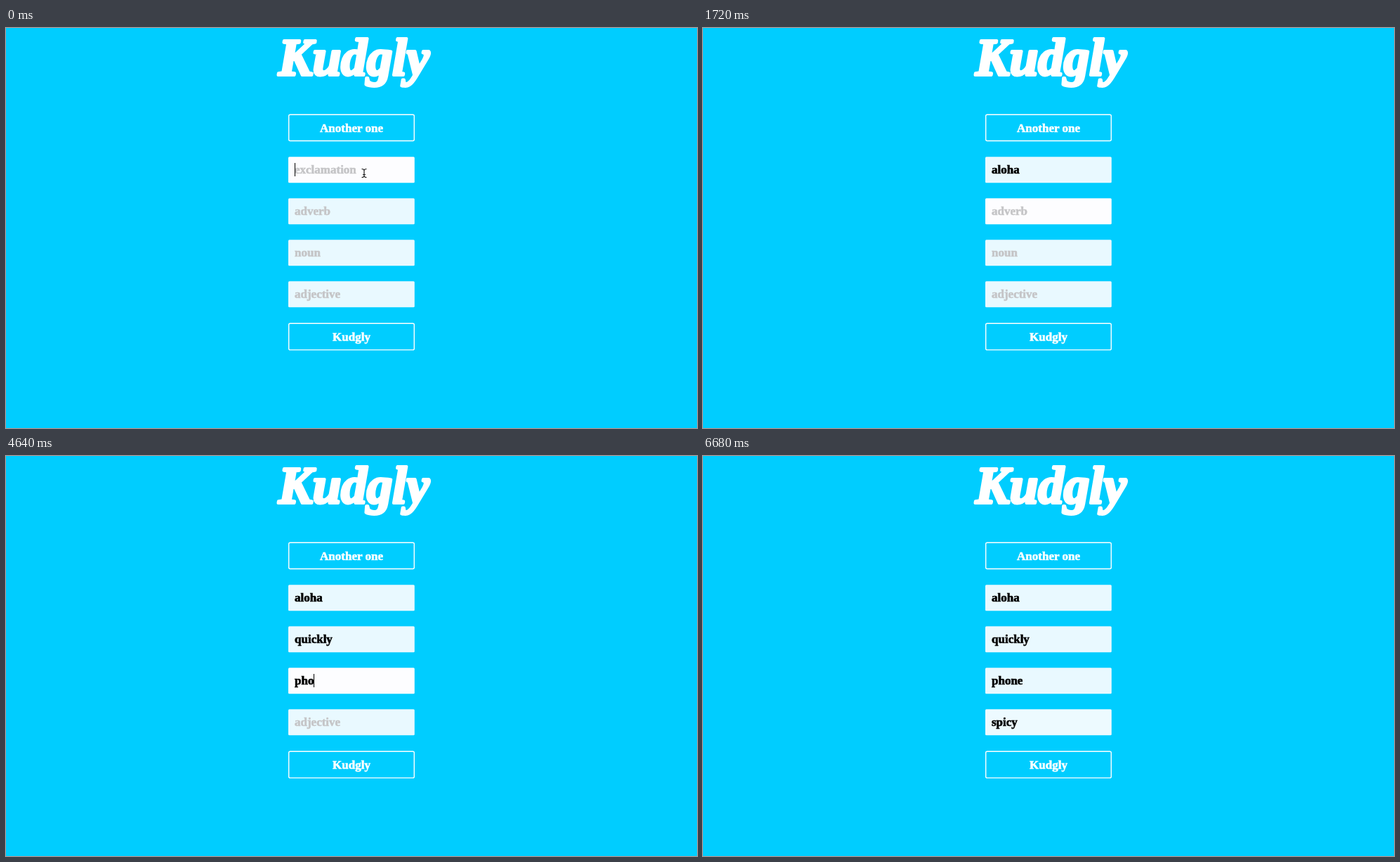
These frames come from a looping animation (984 px wide and 569 px high, 6.72 s). An HTML page:

```html
<!DOCTYPE html>
<html lang="en">
<head>
<meta charset="utf-8">
<title>Word game form</title>
<style>
  html, body { margin: 0; width: 100%; height: 100%; overflow: hidden; background: #00cdff; }
  svg { display: block; width: 984px; height: 569px; }
  text { font: bold 17px "Liberation Serif", "Times New Roman", serif; stroke-width: .6px; }
  .title { font-size: 73px; font-style: italic; fill: #fff; stroke: #fff; stroke-width: 4px; stroke-linejoin: round; }
  .button rect { fill: none; stroke: #fff; stroke-width: 1.4px; }
  .button text { fill: #fff; stroke: #fff; text-anchor: middle; }
  .pointer { fill: none; stroke: #222; stroke-width: 1.2px; }
</style>
</head>
<body>
<svg id="stage" viewBox="0 0 984 569">
  <text class="title" x="388" y="67">Kudgly</text>
  <g class="button">
    <rect x="402.7" y="123.3" width="178.6" height="37.2" rx="2"/>
    <text x="492" y="148">Another one</text>
  </g>
  <g class="button">
    <rect x="402.7" y="420.3" width="178.6" height="37.6" rx="2"/>
    <text x="492" y="445">Kudgly</text>
  </g>
  <g id="fields"></g>
  <path id="pointer" class="pointer" d="M506.5 200.5Q510 200.5 510 203V210Q510 212.5 506.5 212.5M513.5 200.5Q510 200.5 510 203V210Q510 212.5 513.5 212.5M508 208.5H512"/>
  <rect id="caret" width="1" height="19" fill="#000"/>
</svg>
<script>
const LOOP = 6720, STEP = 40, FADE = 200, BLINK = 500;
const LEFT = 411;

// focus and blur times, then the time of each keystroke
const steps = [
  { hint: 'exclamation', word: 'aloha', focus: -400, blur: 1100, keys: [400, 520, 600, 720, 840] },
  { hint: 'adverb', word: 'quickly', focus: 1100, blur: 2920, keys: [2080, 2200, 2320, 2400, 2520, 2600, 2720] },
  { hint: 'noun', word: 'phone', focus: 2920, blur: 5240, keys: [4400, 4520, 4600, 4760, 4880] },
  { hint: 'adjective', word: 'spicy', focus: 5240, blur: 6540, keys: [6000, 6120, 6200, 6320, 6400] }
];

const byId = id => document.getElementById(id);
const caret = byId('caret'), pointer = byId('pointer');

function add(tag, attrs) {
  const el = document.createElementNS('http://www.w3.org/2000/svg', tag);
  for (const name in attrs) el.setAttribute(name, attrs[name]);
  return byId('fields').appendChild(el);
}

const fields = steps.map((step, i) => {
  const top = 183.3 + 59 * i;
  return {
    ...step, top,
    box: add('rect', { x: 402, y: top, width: 179.8, height: 36.9, rx: 1.5 }),
    label: add('text', { x: LEFT, y: top + 24 })
  };
});

function ease(p) {
  p = Math.min(1, Math.max(0, p));
  return p * p * (3 - 2 * p);
}

function blinkOn(t, field) {
  const start = Math.max(field.focus, ...field.keys.filter(k => k <= t));
  const since = start < 0 ? t : t - start;
  return since % (2 * BLINK) < BLINK;
}

function draw(t) {
  caret.style.display = 'none';
  pointer.style.display = t < fields[0].keys[0] ? '' : 'none';
  for (const f of fields) {
    const count = f.keys.filter(k => k <= t).length;
    const color = count ? '#000' : '#c5c5c7';
    f.label.textContent = count ? f.word.slice(0, count) : f.hint;
    f.label.style.fill = f.label.style.stroke = color;

    const glow = ease((t - f.focus) / FADE) - ease((t - f.blur) / FADE);
    f.box.style.fill = `rgba(253,253,255,${0.92 + 0.08 * glow})`;

    if (t >= f.focus && t < f.blur && blinkOn(t, f)) {
      const x = LEFT + (count ? f.label.getComputedTextLength() : -0.5);
      caret.setAttribute('x', Math.round(x));
      caret.setAttribute('y', Math.round(f.top + 9));
      caret.style.display = '';
    }
  }
}

function tick() {
  const t = performance.now() % LOOP;
  draw(Math.floor(t / STEP) * STEP);
  requestAnimationFrame(tick);
}
tick();
</script>
</body>
</html>
```
